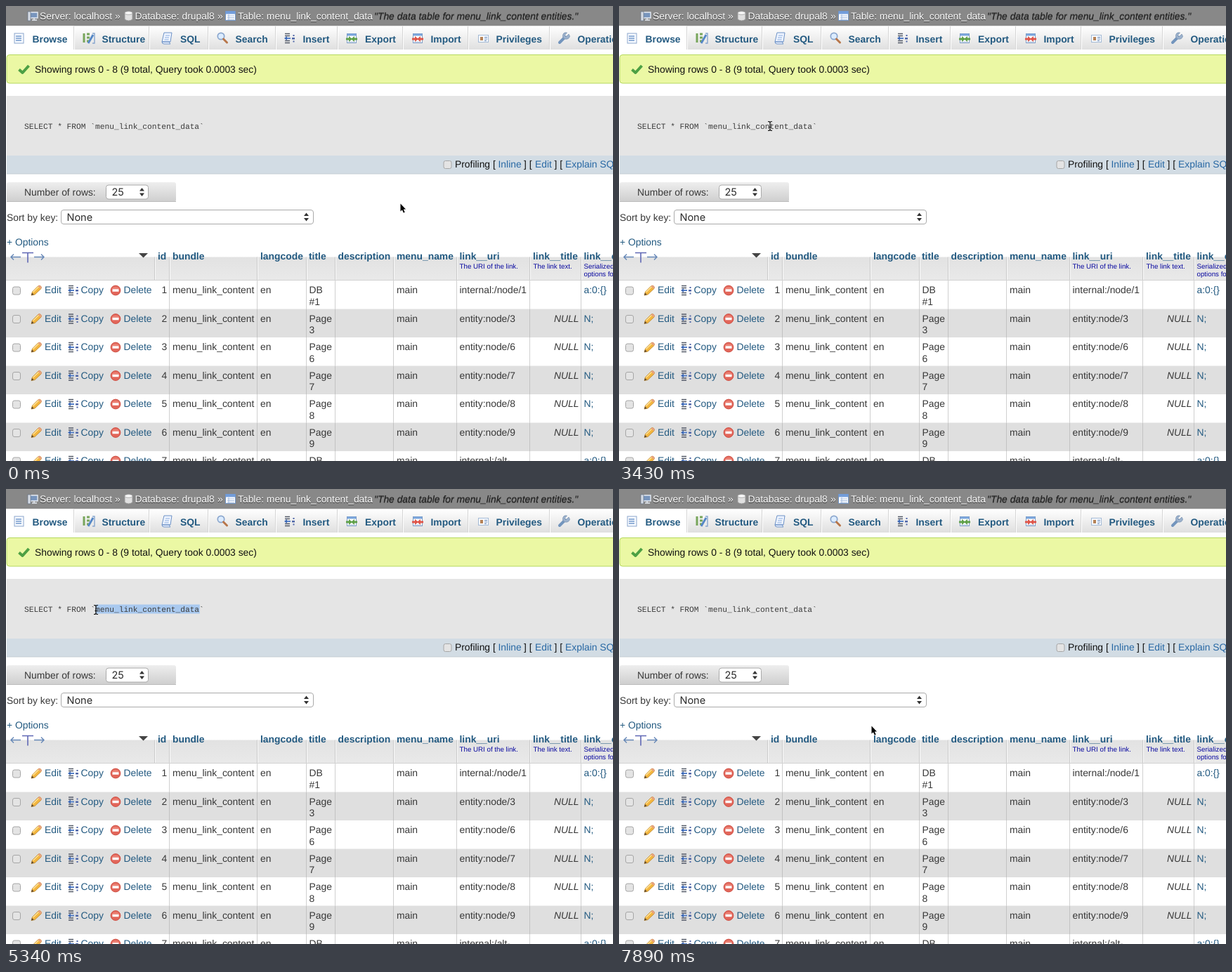
Recreate the animation shown at these times as an HTML page. Size 864 by 648 pixels, loop 8 s.

```html
<!DOCTYPE html>
<html lang="en">
<head>
<meta charset="utf-8">
<title>Table browser</title>
<style>
html, body { margin: 0; width: 100%; height: 100%; overflow: hidden; background: #fff; }
svg { display: block; width: 864px; height: 648px; }
text { font: 13.87px "Liberation Sans", Arial, sans-serif; fill: #383838; text-rendering: geometricPrecision; white-space: pre; }
.bold { font-weight: bold; }
.italic { font-style: italic; }
.link { fill: #235a81; }
.bright { fill: #2868a4; }
.dark { fill: #111; }
.crumb { fill: #fff; text-shadow: 0 1px 0 #333; }
.note { fill: #222; font-style: italic; text-shadow: 0 1px 0 #4a4a4a; }
.small { font-size: 9.75px; fill: #0a0aa0; }
.code { font: 11.23px "Liberation Mono", "Courier New", monospace; fill: #3c3c3c; }
.control { font: 14.5px Inter, sans-serif; fill: #2b2b2b; }
</style>
</head>
<body>
<svg id="stage" viewBox="0 0 864 648" xmlns="http://www.w3.org/2000/svg">
  <defs>
    <linearGradient id="tabFill" x2="0" y2="1"><stop stop-color="#fff"/><stop offset="1" stop-color="#dfdfdf"/></linearGradient>
    <linearGradient id="navFill" x2="0" y2="1"><stop stop-color="#eee"/><stop offset="1" stop-color="#cecece"/></linearGradient>
    <linearGradient id="headFill" x2="0" y2="1"><stop stop-color="#e2e2e2"/><stop offset="1" stop-color="#e9e9e9"/></linearGradient>
    <g id="page"><rect x="1" y="1" width="13" height="14" fill="#f7faff" stroke="#8ba6cc"/></g>
    <g id="pencil">
      <path d="M1 15l1.500-5L11 1.500q2-1 3.500.5t.5 3.500L6 14z" fill="#f3b63f" stroke="#b98428" stroke-width=".8"/>
      <path d="M3.500 10.500L11.500 2.800" stroke="#ffe39a" stroke-width="1.500"/>
      <path d="M10.500 2l4 4 .9-1.200q.5-2-1-3T11.500 1z" fill="#e7a183"/>
      <path d="M1 15l1-3.500 2.700 2.400z" fill="#5a4632"/>
    </g>
    <g id="insert">
      <path d="M1 1.500h7M1 4.500h7M1 11.500h7M1 14.500h7" stroke="#555b69" stroke-width="1.300"/>
      <path d="M3 8h6" stroke="#5580c8" stroke-width="2"/><path d="M0 8l4-3v6z" fill="#3d68b5"/>
      <path d="M11 7h4v2.500h-4zM12.500 3h2v2h-2zM12.500 11.500h2v2h-2z" fill="#5067a8"/>
    </g>
    <g id="delete">
      <circle cx="8" cy="8" r="6.900" fill="#e2665a" stroke="#cf5044"/>
      <path d="M2.500 6A6 5 0 0 1 13.500 6z" fill="#f08b7d" opacity=".7"/>
      <rect x="3.500" y="6.300" width="9" height="3.400" rx=".5" fill="#fff"/>
    </g>
    <g id="grid">
      <rect x=".5" y="1.500" width="14" height="13" fill="#fff" stroke="#7094c6"/>
      <path d="M1 3.500h13" stroke="#729ddb" stroke-width="4"/>
      <path d="M3 8h10M3 10.500h10M3 13h10M5 6v8" stroke="#a5bde0"/>
    </g>
    <g id="transfer">
      <rect x="1.500" y="1.500" width="13" height="13" fill="#fff" stroke="#7d9cc6"/>
      <path d="M2 3h12" stroke="#7ba6dc" stroke-width="3"/><path d="M3 13h10" stroke="#a9bfdd"/>
      <path d="M0 7.500h4V5l5 4-5 4v-2.500H0z" fill="currentColor"/>
      <path d="M16 7.500h-4V5L7 9l5 4v-2.500h4z" fill="currentColor"/>
    </g>
    <g id="spin"><path d="M0-1.500h7L3.500-6zM0 1.500h7L3.500 6z" fill="#333"/></g>
    <g id="check"><rect x=".5" y=".5" width="11" height="11" rx="2.500" fill="#e4e4e4" stroke="#a6a6a6"/></g>
  </defs>
</svg>
<script>
const NS = "http://www.w3.org/2000/svg";
const stage = document.getElementById("stage");

function add(tag, attrs, content) {
  const node = document.createElementNS(NS, tag);
  for (const key in attrs) node.setAttribute(key, attrs[key]);
  if (content !== undefined) node.textContent = content;
  return stage.appendChild(node);
}
const rect = (x, y, width, height, fill, more) => add("rect", { x, y, width, height, fill, ...more });
const label = (x, y, content, cls = "", more) => add("text", { x, y, class: cls, ...more }, content);
const path = (d, more) => add("path", { d, fill: "none", ...more });
const icon = (id, x, y, more) => add("use", { href: "#" + id, x, y, ...more });

function drawBreadcrumb() {
  rect(0, 0, 864, 28.5, "#888");
  path("M34 9h11v8H34zM37 20h7M40 17v3", { fill: "#7895bd", stroke: "#e6ecf4", "stroke-width": 1.4 });
  rect(31, 8, 4, 13, "#d6dce5", { stroke: "#667488", "stroke-width": .7 });
  path("M169 10v9q5.500 4 11 0v-9z", { fill: "#e0e0e0", stroke: "#999" });
  add("ellipse", { cx: 174.5, cy: 10, rx: 5.500, ry: 2.300, fill: "#fafafa", stroke: "#aaa" });
  icon("grid", 312, 6);
  label(48, 19, "Server: localhost", "crumb");
  label(155, 19, "»", "crumb");
  label(183.500, 19, "Database: drupal8", "crumb");
  label(301, 19, "»", "crumb");
  label(330, 19, "Table: menu_link_content_data", "crumb");
  label(524, 19, "\"The data table for menu_link_content entities.\"", "note");
}

function drawTabs() {
  rect(0, 28.5, 864, 33.5, "url(#tabFill)");
  rect(0, 28.5, 96, 33.5, "#fff");
  for (const x of [96, 203, 287, 383, 471, 564, 657, 773]) {
    rect(x, 29, 1, 33, "#d5d5d5");
    rect(x + 1, 29, 1, 33, "#fff");
  }
  const tabs = { Browse: 37.500, Structure: 136.500, SQL: 248, Search: 326.500, Insert: 422.500,
                 Export: 511, Import: 604.500, Privileges: 697.500, Operations: 813.500 };
  for (const name in tabs) label(tabs[name], 51.500, name, "bold link");

  icon("page", 11, 38);
  path("M14 43h8M14 46h8M14 49h8", { stroke: "#7298cc", "stroke-width": 1.3 });
  path("M111 39v13M115 40h4M115 45h4M115 50h4", { stroke: "#78a65c", "stroke-width": 3 });
  path("M117 53l7-12", { stroke: "#5688c6", "stroke-width": 3 });
  path("M123 39l3 0v14h-3", { stroke: "#87a5ce", "stroke-width": 1.4 });
  path("M225 38h11l-2 13h-12zM222 51q0 3 3 3h9q-2-1-1-3z", { fill: "#eef4ff", stroke: "#6c91c6" });
  path("M227 42h6M226 45h6M225.500 48h6", { stroke: "#8daede" });
  add("circle", { cx: 306, cy: 43, r: 4.700, fill: "#dcecff", stroke: "#8aa6cd", "stroke-width": 1.7 });
  path("M309.500 47l5 5", { stroke: "#b8764a", "stroke-width": 3, "stroke-linecap": "round" });
  icon("insert", 396, 38);
  icon("transfer", 484, 38, { color: "#61a14a" });
  icon("transfer", 578, 38, { color: "#df564a" });
  rect(672.5, 41.5, 14, 10, "#f7faff", { stroke: "#a4bad5" });
  rect(675, 44, 4, 5, "#b78458");
  path("M681 44.500h4M681 47h4M681 49.500h3", { stroke: "#6687b4" });
  path("M788 52l8-8", { stroke: "#7395bd", "stroke-width": 4, "stroke-linecap": "round" });
  path("M801 40l-4 4-2-2 3.500-4q-6-1-6 5 0 3 3 4 6 1 7-4z", { fill: "#9cb2cd", stroke: "#7890ae", "stroke-width": .7 });
}

function drawQuery() {
  rect(1, 69.5, 880, 40.5, "#ebf8a4", { rx: 4, stroke: "#b5d95e" });
  path("M18.500 90.500l5 4.500 9-10", { stroke: "#4da044", "stroke-width": 4, "stroke-linejoin": "round" });
  label(41, 94.500, "Showing rows 0 - 8 (9 total, Query took 0.0003 sec)", "dark");

  rect(1, 128, 863, 85, "#e5e5e5");
  rect(1, 213, 863, 26, "#d2dce4");
  rect(1, 238.5, 863, 1, "#c6cdd3");
  icon("check", 622.500, 220);
  label(639, 230, "Profiling [", "dark");
  label(700.500, 230, "Inline", "bright");
  label(737, 230, "] [", "dark");
  label(753, 230, "Edit", "bright");
  label(780.500, 230, "] [", "dark");
  label(796, 230, "Explain SQL", "bright");
}

function drawControls() {
  const select = (x, y, width, height, value, arrowX) => {
    rect(x + .5, y + .5, width, height, "#fff", { rx: 3.500, stroke: "#aaa" });
    label(x + 8.5, y + 15.500, value, "control");
    icon("spin", arrowX, y + height / 2 + .5);
  };
  rect(1, 251, 241, 28, "url(#navFill)", { rx: 3 });
  rect(1, 278, 241, 1, "#bcbcbc");
  label(26, 270, "Number of rows:");
  select(142, 254.5, 60, 20, "25", 190);
  label(1, 305.500, "Sort by key:");
  select(78, 290, 359, 20, "None", 424);
  label(1, 341, "+ Options", "link");
}

const columns = [232, 357, 427, 468, 551, 641, 745, 818];

function drawHeader() {
  rect(0, 357.5, 864, 33, "url(#headFill)");
  for (const x of [211, ...columns]) {
    rect(x, 357.5, 1, 33, "#c9c9c9");
    rect(x + 1, 357.5, 1, 33, "#fafafa");
  }
  rect(0, 390, 864, 1, "#d2d2d2");
  path("M7 357.500h14M11 353.500l-4 4 4 4M40 357.500h14M50 353.500l4 4-4 4", { stroke: "#6688b7", "stroke-width": 1.4 });
  path("M23 351.500h16M31 351.500v14", { stroke: "#6068b5", "stroke-width": 1.6 });
  path("M189 352h13l-6.500 6.500z", { fill: "#444" });
  const titles = { id: 216, bundle: 237, langcode: 362, title: 431, description: 472.500,
                   menu_name: 556, link__uri: 645.500, link__title: 750, link__options: 822.500 };
  for (const name in titles) label(titles[name], 361, name, "bold link");
  label(645.500, 374, "The URI of the link.", "small");
  label(750.500, 374, "The link text.", "small");
  label(822.500, 374, "Serialized", "small");
  label(822.500, 385, "options for", "small");
}

function drawRow(index) {
  const top = 391 + index * 40.5, base = top + 18;
  const page = [0, 3, 6, 7, 8, 9][index];
  const shaded = index % 2;
  if (shaded) rect(0, top, 864, 40.5, "#dfdfdf");
  for (const x of columns) rect(x, top, 1, 40.5, shaded ? "#c2c2c2" : "#d0d0d0");

  icon("check", 9, top + 8.5);
  icon("pencil", 35, top + 6);
  icon("insert", 88, top + 6);
  icon("delete", 148, top + 6);
  label(55, base, "Edit", "link");
  label(106.500, base, "Copy", "link");
  label(167.500, base, "Delete", "link");
  label(229.300, base, index + 1, "", { "text-anchor": "end" });
  label(237, base, "menu_link_content");
  label(362, base, "en");
  label(431.500, base, page ? "Page" : "DB");
  label(431.500, base + 16.5, page || "#1");
  label(556, base, "main");
  label(645.500, base, page ? "entity:node/" + page : index ? "internal:/alt-" : "internal:/node/1");
  if (page) label(815.500, base, "NULL", "italic", { "text-anchor": "end" });
  label(822.500, base, page ? "N;" : "a:0:{}", "link");
}

drawBreadcrumb();
drawTabs();
drawQuery();
drawControls();
drawHeader();
for (let i = 0; i < 7; i++) drawRow(i);

const textLeft = 127.5, charWidth = 6.74, charCount = 22;
const selection = rect(textLeft, 164.5, 0, 13, "#a9c9ef");
label(26, 175, "SELECT * FROM `menu_link_content_data`", "code");
const arrow = path("M.5.500v11l2.400-2.300 1.900 4.300 1.900-.8-1.900-4.200h3.200z",
  { fill: "#000", stroke: "#fff", "stroke-width": 1.2, "paint-order": "stroke" });
const beam = path("M-3-6.500q3 0 3 1.500 0-1.500 3-1.500M0-5V5M-3 6.500q3 0 3-1.500 0 1.500 3 1.500M-1.500 1.500h3",
  { stroke: "#111", "stroke-width": 1.2 });

const soft = p => (p + p * p * (3 - 2 * p)) / 2;
const smooth = p => p * p * (3 - 2 * p);
const out = p => 1 - (1 - p) ** 2;

// Each move: first step, last step, step count, end point, easing.
const start = { x: 561, y: 281 };
const moves = [
  [1050, 1500, 4, 359, 218, smooth],
  [1800, 2250, 4, 152, 183, out],
  [2400, 2540, 2, 142, 175, soft],
  [2690, 2840, 2, 147, 172, soft],
  [2990, 3430, 4, 215, 171, soft],
  [3580, 4010, 4, 274, 174, out],
  [4160, 4160, 1, 275, 174, soft],
  [4460, 5340, 7, 128, 172, soft],
  [5640, 6090, 4, 369, 197, soft],
  [7740, 7890, 2, 359, 337, soft],
];

function pointerAt(time) {
  let { x, y } = start;
  for (const [first, last, count, endX, endY, ease] of moves) {
    if (time < first) break;
    const gap = (last - first) / Math.max(1, count - 1);
    let step = 1;
    while (step < count && time >= Math.round((first + step * gap) / 10) * 10) step++;
    const p = ease(step / count);
    x += (endX - x) * p;
    y += (endY - y) * p;
  }
  return { x: Math.round(x), y: Math.round(y) };
}

function render(time) {
  const { x, y } = pointerAt(time);
  const overText = y < 180 && x < 282;
  const place = `translate(${x} ${y})`;
  arrow.setAttribute("transform", place);
  beam.setAttribute("transform", place);
  arrow.setAttribute("visibility", overText ? "hidden" : "visible");
  beam.setAttribute("visibility", overText ? "visible" : "hidden");

  const selecting = time >= 4610 && time < 6540;
  const from = time < 5340 ? Math.max(0, Math.round((x - textLeft) / charWidth)) : 0;
  selection.setAttribute("x", textLeft + from * charWidth);
  selection.setAttribute("width", selecting ? (charCount - from) * charWidth : 0);
}

const origin = performance.now();
function tick() {
  render((performance.now() - origin) % 8000);
  requestAnimationFrame(tick);
}
tick();
</script>
</body>
</html>
```
